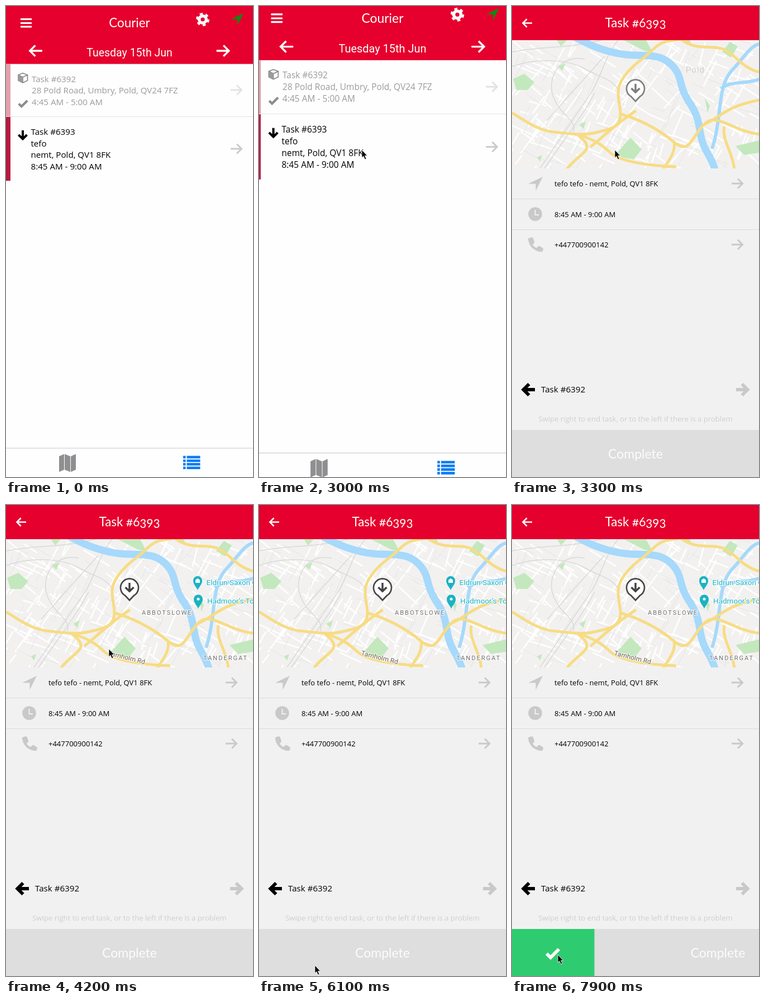
Write an HTML page that moves like this. It is 442 px wide and 841 px high and loops after 8 s.

```html
<!DOCTYPE html>
<html lang="en">
<head>
<meta charset="utf-8">
<title>Courier task</title>
<style>
  html, body { margin: 0; width: 100%; height: 100%; overflow: hidden; background: #fefefe; }
  svg { display: block; width: 100%; height: 100%; }
  text { font-family: "Open Sans", sans-serif; font-size: 13px; }
  .title { font: 400 22.4px Lato, sans-serif; font-variant-numeric: oldstyle-nums; fill: #fff; text-anchor: middle; }
  .date { font: 400 19.5px Roboto, sans-serif; fill: #fff; text-anchor: middle; }
  .row text { font-size: 15.15px; }
  .line { fill: none; stroke-width: 3; }
  .road { fill: none; stroke: #f7dc84; stroke-width: 5; stroke-linejoin: round; }
  .rail { fill: none; stroke: #d9d9d9; stroke-width: 1.5; }
  .river { fill: none; stroke: #a6d9fb; stroke-linejoin: round; }
  .label text { font-family: Roboto, sans-serif; paint-order: stroke; stroke: #fff; stroke-width: 2px; }
  .area { font-size: 11px; letter-spacing: 2px; fill: #6b6b6b; }
  .poi { font-size: 13.5px; fill: #1ab3c4; }
</style>
</head>
<body>
<svg viewBox="0 0 442 841" preserveAspectRatio="none">
  <defs>
    <path id="arrow" class="line" d="M-10 0H9M1-8.5 9.5 0 1 8.5"/>
    <path id="boldArrow" fill="none" stroke-width="6" d="M12.5 0H-8M2-10-8 0 2 10"/>
    <path id="check" fill="none" stroke-width="6" d="M-11 0-4 7 11-8"/>
    <path id="compass" d="M26 0 0 12.5H13.5V25Z"/>
    <path id="pin" d="M0 16C-3 9-8 6-8-1A8 8 0 0 1 8-1C8 6 3 9 0 16Z" fill="#1ab3c4"/>
    <linearGradient id="crimson" x2="1"><stop stop-color="#a91a3c"/><stop offset="1" stop-color="#c21d42"/></linearGradient>
    <clipPath id="mapClip"><path d="M0 61H442V290H0Z"/></clipPath>
  </defs>

  <g id="list">
    <path fill="#fefefe" d="M0 0H442V841H0Z"/>
    <path fill="#e6002d" d="M0-20H442V103.500H0Z"/>
    <path class="line" stroke="#fff" d="M26 23.500H46M26 30.500H46M26 37H46"/>
    <text class="title" x="221" y="38">Courier</text>
    <g fill="none" stroke="#fff" transform="translate(352 24)">
      <circle r="6.300" stroke-width="5.400"/>
      <circle r="10.200" stroke-width="3.600" pathLength="12" stroke-dasharray="1 1"/>
    </g>
    <use href="#compass" transform="translate(403 13) scale(.84)" fill="#0a8a12"/>
    <use href="#arrow" transform="translate(53.500 80) scale(-1.130)" stroke="#fff"/>
    <use href="#arrow" transform="translate(388 80) scale(1.130)" stroke="#fff"/>
    <text class="date" x="221" y="90">Tuesday 15th Jun</text>

    <g class="row" fill="#9b9b9b">
      <path fill="#e2a0ae" d="M0 104H8V197H0Z"/>
      <path fill="none" stroke="#8a8a8a" stroke-width="1.700" d="M22 123 30 120 38.500 123V133L30 137 22 133ZM22 123 30 127 38.500 123M30 127V137"/>
      <path d="M22 123 30 127V137L22 133Z"/>
      <use href="#check" transform="translate(30.500 174.500) scale(.7)" stroke="#8c8c8c"/>
      <text x="46" y="135.500">Task #6392</text>
      <text x="46" y="156">28 Pold Road, Umbry, Pold, QV24 7FZ</text>
      <text x="46" y="176.500">4:45 AM - 5:00 AM</text>
      <use href="#arrow" x="412" y="150" stroke="#e3e3e3"/>
    </g>
    <path stroke="#e2e2e2" d="M0 197.500H442"/>
    <g class="row">
      <path fill="url(#crimson)" d="M0 198H8V312H0Z"/>
      <path fill="none" stroke="#000" stroke-width="4" d="M30 222V237M22.500 230 30 237.500 37.500 230"/>
      <text x="44.500" y="230">Task #6393</text>
      <text x="44.500" y="250.500">tefo</text>
      <text x="44.500" y="271">nemt, Pold, QV1 8FK</text>
      <text x="44.500" y="291.500">8:45 AM - 9:00 AM</text>
      <use href="#arrow" x="412" y="255" stroke="#cbcbcb"/>
    </g>

    <path stroke="#ccc" d="M0 789.500H442"/>
    <path fill="#8f8f92" d="M95 804 104 800V828L95 832ZM105 800 115 804V832L105 828ZM116 804 125 800V828L116 832Z"/>
    <path stroke="#0a7cf5" stroke-width="4.600" d="M317 805.500h4.500m2 0h24M317 812h4.500m2 0h24M317 818.300h4.500m2 0h24M317 824.700h4.500m2 0h24"/>
  </g>

  <g id="detail">
    <path fill="#f1f1f1" d="M0 0H442V841H0Z"/>
    <g clip-path="url(#mapClip)">
      <path fill="#f2f1f0" d="M0 61H442V290H0Z"/>
      <path id="streets" fill="none" stroke="#fff" stroke-width="2.500"/>
      <path id="lanes" fill="none" stroke="#e5e5e6" stroke-width="1"/>
      <path fill="#c3e8bd" d="M2 130 22 121 40 136 28 150H8ZM80 61H98L88 72ZM200 61H240L252 84 235 79ZM82 108 96 102 90 116ZM188 262 212 235 232 256 218 274 196 270ZM120 212 132 206 128 219ZM306 61H318L322 72ZM376 82 390 64 404 72 392 92ZM345 165 354 178 350 190ZM400 250 442 240V262L415 266ZM45 270 54 266 50 278Z"/>
      <path class="rail" d="M50 290C95 225 110 200 135 165S165 90 190 61M58 290C110 215 130 190 148 155M130 95C85 85 60 130 75 165S115 200 110 225M0 108C45 92 100 95 130 112S180 130 190 150M62 205 165 90M0 82C60 70 90 78 160 61"/>
      <path class="river" stroke-width="6" d="M442 68C425 72 412 96 398 110S378 138 374 165 368 225 358 255M442 131C415 140 390 133 374 148"/>
      <path class="river" stroke-width="13" d="M112 55C150 77 190 88 225 88S275 92 290 110 299 145 316 170 333 205 338 232 356 265 364 295"/>
      <path class="road" d="M0 191C25 205 45 222 75 225S125 232 150 226 193 217 194 195 181 153 200 127 232 98 252 78 285 64 305 58M117 229C150 240 160 247 176 262S240 285 294 287M140 252C165 232 195 203 222 187M195 193C230 203 262 220 290 243S320 236 343 212 390 222 442 229M290 243C293 260 283 273 270 292M300 58C330 82 360 68 380 78S415 112 442 118M343 212C375 198 380 180 442 168M117 229C130 240 140 249 130 260S105 280 98 292M380 215C375 240 395 260 398 292"/>
      <text id="cityLabel" x="311" y="119" style="font:15px Roboto,sans-serif;letter-spacing:1px" fill="#d0d0d0">Pold</text>
      <g id="labels" class="label">
        <use href="#pin" x="343" y="136"/><use href="#pin" x="344" y="169"/>
        <path fill="#fff" d="M339 134 343 131 347 134V139H339Z"/><circle cx="344" cy="168" r="2.500" fill="#fff"/>
        <text class="poi" x="358.500" y="143">Eldrun Saxon C</text>
        <text class="poi" x="360" y="176">Hadmoor’s Tow</text>
        <text class="area" x="243" y="196">ABBOTSLOWE</text>
        <text class="area" x="353" y="277">TANDERGAT</text>
        <text transform="translate(182 268) rotate(14)" style="font-size:12px" fill="#6a5e48">Tarnholm Rd</text>
      </g>
      <g id="marker" stroke="#444" stroke-width="2.600" fill="#fff" transform="translate(221 147)">
        <path d="M0 23-8 14.500A16 16 0 1 1 8 14.500Z"/>
        <path fill="none" stroke-width="3.500" d="M0-8V6M-7.500 0 0 7 7.500 0"/>
      </g>
    </g>
    <path fill="#e6002d" d="M0 0H442V61H0Z"/>
    <use href="#arrow" transform="translate(27.500 30.500) scale(-.85)" stroke="#fff"/>
    <text class="title" x="221" y="38">Task #6393</text>

    <g fill="#c9c9c9">
      <use href="#compass" x="29" y="305"/>
      <circle cx="41.500" cy="371.500" r="12.300"/>
      <path fill="none" stroke="#f1f1f1" stroke-width="2" d="M41.500 364V373H48"/>
      <path d="M29 415l6-2q2 0 3 2l2 6q0 2-1 3l-2 2q3 5 7 6l3-3q1-1 3 0l5 3q1 1 1 3l-2 4C40 439 29 428 29 415Z"/>
    </g>
    <path stroke="#dcdcdc" d="M0 344.500H442M0 399.500H442"/>
    <use href="#arrow" x="403" y="317" stroke="#c9c9c9"/>
    <use href="#arrow" x="403" y="426" stroke="#c9c9c9"/>
    <text x="76" y="322">tefo tefo - nemt, Pold, QV1 8FK</text>
    <text x="76" y="377">8:45 AM - 9:00 AM</text>
    <text x="76" y="431">+447700900142</text>
    <use href="#boldArrow" x="28.500" y="685" stroke="#000"/>
    <use href="#boldArrow" transform="translate(413.500 685) scale(-1)" stroke="#c9c9c9"/>
    <text x="52" y="690" style="font-size:15.150px">Task #6392</text>
    <text x="221" y="742" text-anchor="middle" style="font-size:13.100px" fill="#cfcfcf">Swipe right to end task, or to the left if there is a problem</text>

    <path fill="#2fcb71" d="M0 757H442V841H0Z"/>
    <use href="#check" x="73" y="801" stroke="#fff"/>
    <g id="slider">
      <path fill="#dedede" d="M0 757H442V841H0Z"/>
      <text class="title" x="221" y="808" style="font-size:23px" fill-opacity=".9">Complete</text>
    </g>
  </g>

  <path id="cursor" stroke="#fff" stroke-width=".8" d="M0 0V14L3 11.300 5.600 17 8 16 5.500 10.300H9.700Z"/>
</svg>

<script>
const LOOP = 8000, STEP = 100;
const el = id => document.getElementById(id);
const clamp = v => Math.min(1, Math.max(0, v));
const ramp = (t, from, to) => clamp((t - from) / (to - from));

// Keys are [time, ...values], linearly interpolated.
const cursorKeys = [
  [400, 430, 482], [600, 377, 463], [800, 287, 448], [1000, 245, 398], [1200, 192, 323],
  [1300, 172, 291], [1400, 184, 258], [1800, 184, 258], [1900, 184, 257],
  [4300, 184, 257], [5100, 150, 362], [5700, 85, 700], [6100, 100, 822],
  [6500, 58, 822], [6700, 58, 822], [7200, 224, 822], [7300, 224, 822], [7700, 100, 806], [7900, 82, 803]
];
const slideKeys = [[6700, 0], [7200, 166], [7300, 166], [7500, 147.5]];

function sample(keys, t) {
  const next = keys.findIndex(k => k[0] > t);
  if (next === 0) return keys[0].slice(1);
  if (next < 0) return keys[keys.length - 1].slice(1);
  const a = keys[next - 1], b = keys[next], u = ramp(t, a[0], b[0]);
  return a.slice(1).map((v, i) => v + (b[i + 1] - v) * u);
}

// Small streets: short seeded strokes along two tilted directions.
let seed = 11;
const random = () => (seed = seed * 16807 % 2147483647) / 2147483647;
function streets(count) {
  let d = "";
  for (let i = 0; i < count; i++) {
    const angle = 0.5 + (i % 2) * Math.PI / 2 + (random() - 0.5) * 0.5;
    const length = 15 + random() * 40;
    d += `M${random() * 442} ${61 + random() * 229}l${Math.cos(angle) * length} ${Math.sin(angle) * length}`;
  }
  return d;
}
el("streets").setAttribute("d", streets(190));
el("lanes").setAttribute("d", streets(80));

const zoom = (id, s) => el(id).setAttribute("transform", `translate(221 407) scale(${s}) translate(-221 -407)`);

function draw(t) {
  const open = 1 - (1 - ramp(t, 2955, 3355)) ** 3;
  const shown = t >= 3300 ? 1 : ramp(open, 0.6, 0.875);
  zoom("list", 1 + 0.075 * open);
  zoom("detail", t >= 3300 ? 1 : 0.85 + 0.15 * open);
  el("detail").setAttribute("opacity", shown);
  el("detail").setAttribute("visibility", shown ? "visible" : "hidden");

  const loaded = ramp(t, 3300, 3700);
  el("labels").setAttribute("opacity", loaded);
  el("cityLabel").setAttribute("opacity", 1 - loaded);
  el("marker").setAttribute("stroke", `rgb(${Array(3).fill(125 - 57 * loaded)})`);

  el("slider").setAttribute("transform", `translate(${sample(slideKeys, t)} 0)`);
  el("cursor").setAttribute("transform", `translate(${sample(cursorKeys, t)})`);
  el("cursor").setAttribute("visibility", t < 400 ? "hidden" : "visible");
}

const start = performance.now();
function tick() {
  const t = (performance.now() - start) % LOOP;
  draw(Math.floor(t / STEP) * STEP);
  requestAnimationFrame(tick);
}
tick();
</script>
</body>
</html>
```
